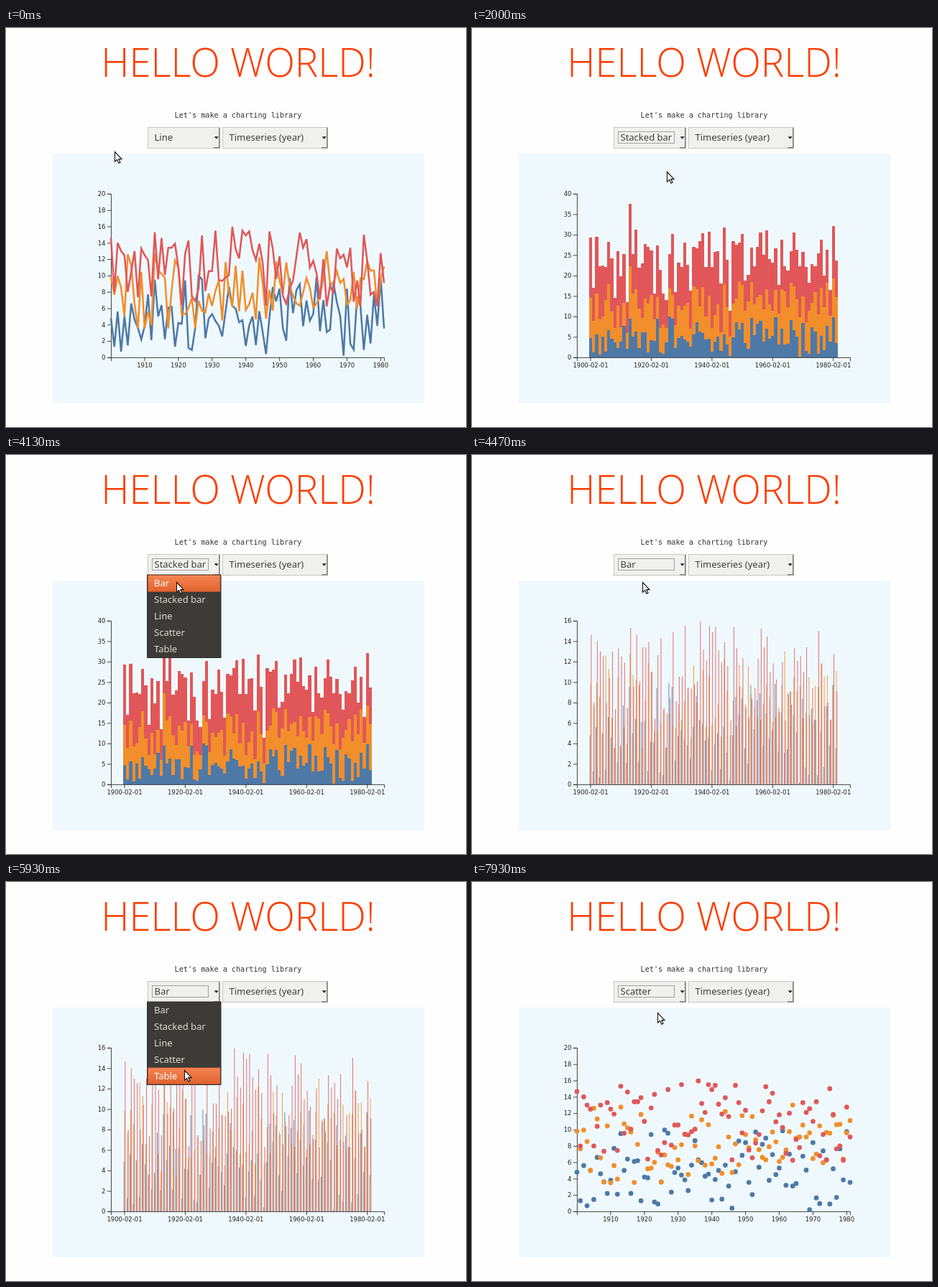
An HTML page that plays this animation: 640 px wide and 556 px high, repeating every 8 s.

```html
<!DOCTYPE html>
<html lang="en">
<head>
<meta charset="utf-8">
<title>Charting library</title>
<style>
  html, body { margin: 0; width: 100%; height: 100%; overflow: hidden; background: #fefefe; }
  svg { display: block; }
  text { white-space: pre; }
  .title { font: 300 54.5px "Open Sans", "Noto Sans", sans-serif; fill: #ff3d00; text-anchor: middle; }
  .sub { font: 10.13px "DejaVu Sans Mono", monospace; fill: #333; text-anchor: middle; }
  .ui { font: 13px "Noto Sans", "Open Sans", sans-serif; fill: #3c3c3c; }
  .menu text { fill: #dfdbd2; }
  .menu text.on { fill: #fff; }
  .axis { font: 10px "DejaVu Sans", sans-serif; }
  .axis path { fill: none; stroke: #222; }
  .axis text { fill: #222; }
  .line { fill: none; stroke-width: 3; }
</style>
</head>
<body>
<svg id="stage" width="640" height="556" viewBox="0 0 640 556">
  <defs>
    <linearGradient id="glow" x2="0" y2="1">
      <stop offset="0" stop-color="#f58553"/>
      <stop offset="1" stop-color="#e0622e"/>
    </linearGradient>
    <g id="box">
      <path d="M0 0h1v29h-1z" fill="#c4c4c0"/>
      <path d="M0 29.5V.5H100" fill="none" stroke="#c8c8c4"/>
    </g>
  </defs>
  <text class="title" x="323" y="68">HELLO WORLD!</text>
  <text class="sub" x="323" y="125">Let's make a charting library</text>
  <rect x="65" y="175" width="517" height="348" fill="#eff9fd"/>
  <g id="charts" transform="translate(146 231) scale(.8444)"></g>
  <g id="selects"></g>
  <text class="ui" id="value" x="206.5" y="157.3"></text>
  <text class="ui" x="310.5" y="157.3">Timeseries (year)</text>
  <rect id="focus" x="203.5" y="144.5" width="78" height="16" fill="none" stroke="#444" stroke-width=".9" stroke-dasharray="1 1"/>
  <g id="menu" class="menu">
    <rect x="196.5" y="167" width="102.5" height="115.5" fill="#3c3b37" stroke="#2f2e2a"/>
    <rect id="mark" x="197.5" width="100.5" height="22.8" fill="url(#glow)" stroke="#c9531f" stroke-width=".5"/>
  </g>
  <path id="cursor" d="M.5 .5V14.2L3.6 11.4 5.9 16.3 8 15.3 5.8 10.6H10z" fill="#fff" stroke="#111" stroke-width="1.1"/>
</svg>
<script>
const NS = "http://www.w3.org/2000/svg";
const $ = id => document.getElementById(id);
function add(parent, tag, attrs, text) {
  const el = document.createElementNS(NS, tag);
  for (const k in attrs) el.setAttribute(k, attrs[k]);
  if (text !== undefined) el.textContent = text;
  parent.appendChild(el);
  return el;
}

// yearly values, 1900 to 1981
const blue = [4.8, 1.3, 5.6, .7, 5, 1.45, 6.6, 4.6, 3.6, 2.2, 3.8, 7.7, 2.1, 9.5, 5, 6.4, 2.2, 6.1, 6.2, 1.3,
  4.2, 4.1, 9.4, 1.15, .9, 3.6, 9.95, 9.55, 2.35, 4.75, 5.3, 4.45, 3.85, 2.55, 5.65, 8.65, 6.3, 5.95, 4.3, 4.55,
  1.4, 3.9, 5, 1.5, 5.65, 3.1, .4, 4.85, 8.6, 6.85, 8.4, 3.55, 2.05, 9.7, 5.4, 8.2, 8.95, 3.8, 6.95, 4.5,
  5.3, 9.85, 3.2, 7, 3.1, 3.4, 9.1, 6.75, 5.05, .2, 8.4, 1.65, .95, 7.4, 6.3, .9, 5.2, 1.7, 7.65, 3.85, 9.75, 3.55];
const orange = [9.8, 7.65, 9.95, 8.55, 5, 12.6, 11.3, 6.55, 3.6, 10.45, 3.5, 5.6, 3.95, 12.75, 10.7, 10.2, 9.7, 3.55, 8.2, 11.85,
  11, 5.2, 5.3, 6, 7.25, 3.6, 6.9, 5.7, 5.5, 7.8, 6.3, 8.15, 9.4, 4.5, 11.65, 8, 6.2, 11.2, 5.65, 10.6,
  5.8, 6.5, 7.9, 4.65, 12.2, 9.1, 4.75, 8.25, 5.7, 11.7, 9.4, 7.8, 11.6, 8.75, 7.55, 6.6, 6.3, 7.9, 9.7, 8.5,
  6.1, 6.6, 7.5, 9.75, 13, 8.95, 9.1, 10.55, 9.1, 9.6, 6.45, 7, 10.45, 5.95, 9.65, 9.55, 11.75, 10.6, 10.65, 6.4, 9.6, 11.1];
const red = [14.65, 8, 14, 13, 12.5, 8, 10.4, 13, 7.35, 13.3, 12.5, 11.9, 7.45, 15.3, 9.55, 14.6, 10.05, 13.4, 13.4, 13.9,
  11, 6.4, 12.65, 14.3, 7.45, 6.9, 8.4, 14.9, 8.1, 10.55, 10.55, 15.5, 9.45, 9.35, 9.75, 10.05, 15.95, 13.2, 12.1, 15.5,
  14.9, 15.4, 13.1, 11.9, 13.9, 11.6, 6.3, 15.4, 13.3, 9.6, 12.35, 7.5, 6.55, 8.35, 9.4, 12.3, 15.25, 13.4, 14.45, 10.95,
  11.8, 10.25, 7.1, 12, 6.25, 8.8, 7.8, 13.3, 12.1, 12.55, 11, 13.4, 6.8, 9.4, 6.3, 15, 11.85, 7.65, 8, 6.25, 12.75, 9.1];
const series = [blue, orange, red];
const colors = ["#4e79a7", "#f28e2b", "#e15759"];
const W = 450, H = 270, STEP = 5, PAD = 20;
const yearX = i => i * W / 81;
const bandX = i => PAD + i * STEP;

function axes(g, max, gap, bands) {
  const a = add(g, "g", { class: "axis" });
  let d = `M-6 ${H + .5}H.5V.5H-6M.5 ${H + 6}V${H + .5}H${W + .5}V${H + 6}`;
  for (let v = 0; v <= max; v += gap) {
    const y = H - v / max * H + .5;
    d += `M0 ${y}H-6`;
    add(a, "text", { x: -9, y: y + 3.4, "text-anchor": "end" }, v);
  }
  for (let i = bands ? 0 : 10; i < 82; i += bands ? 20 : 10) {
    const x = bands ? bandX(i) + STEP / 2 : yearX(i - 1 / 12) + .5;
    d += `M${x} ${H}v6`;
    add(a, "text", { x, y: H + 16.1, "text-anchor": "middle" }, 1900 + i + (bands ? "-02-01" : ""));
  }
  add(a, "path", { d });
}

function chart(max, gap, bands, draw) {
  const g = add($("charts"), "g");
  const y = v => H - v / max * H;
  if (bands) draw(g, y);
  axes(g, max, gap, bands);
  if (!bands) draw(g, y);
  return g;
}

const bar = (x, top, bottom, w) => `M${x} ${bottom}V${top}h${w}V${bottom}z`;

const charts = {
  "Line": chart(20, 2, false, (g, y) => series.forEach((s, j) =>
    add(g, "path", { class: "line", stroke: colors[j], d: "M" + s.map((v, i) => yearX(i) + " " + y(v)).join("L") }))),
  "Stacked bar": chart(40, 5, true, (g, y) => {
    const base = blue.map(() => 0);
    series.forEach((s, j) => add(g, "path", {
      fill: colors[j], "shape-rendering": "crispEdges",
      d: s.map((v, i) => bar(bandX(i), y(base[i] + v), y(base[i]), STEP, base[i] += v)).join("")
    }));
  }),
  "Bar": chart(16, 2, true, (g, y) => series.forEach((s, j) =>
    add(g, "path", { fill: colors[j], d: s.map((v, i) => bar(bandX(i) + 1 + j, y(v), H, 1)).join("") }))),
  "Scatter": chart(20, 2, false, (g, y) => series.forEach((s, j) =>
    s.forEach((v, i) => add(g, "circle", { cx: yearX(i), cy: y(v), r: 4, fill: colors[j] }))))
};

function select(x, w) {
  const g = add($("selects"), "g", { transform: `translate(${x} 138)` });
  add(g, "rect", { x: .5, y: .5, width: w - 1, height: 29, fill: "#f0f0ee", stroke: "#c6c6c2" });
  add(g, "path", { d: `M${w - 9} 28.8H${w - 1.2}V1`, fill: "none", stroke: "#8b8b86", "stroke-width": 1.8 });
  add(g, "path", { d: `M${w - 8.3} 13.2h6l-3 3.6z`, fill: "#222" });
}
select(197, 101);
select(301, 147);

const ROW = 22.8, TOP = 167.7;
const items = ["Bar", "Stacked bar", "Line", "Scatter", "Table"];
const labels = items.map((s, i) => add($("menu"), "text", { class: "ui", x: 206, y: 183.3 + i * ROW }, s));

const STEPS = 120, LOOP = 8000;
const path = [
  [4, 151, 172], [8, 215, 215], [11, 304, 232], [13, 300, 190], [15, 285, 160],
  [22, 285, 160], [24, 280, 232], [26, 271, 200],
  [33, 271, 200], [36, 245, 165], [39, 205, 135], [42, 225, 121], [45, 254, 175],
  [49, 254, 175], [52, 234, 153],
  [58, 234, 153], [60, 238, 212], [62, 237, 177],
  [70, 237, 177], [72, 247, 160], [74, 258, 142],
  [81, 258, 142], [82, 254, 170], [86, 250, 215], [89, 248, 262], [91, 247, 258],
  [94, 247, 258], [99, 245, 242],
  [117, 245, 242], [119, 258, 182]
];
const picks = [[0, "Line"], [29, "Stacked bar"], [65, "Bar"], [101, "Scatter"]];
const opens = [[19, 29], [55, 65], [76, 101]];

function cursorAt(k) {
  const n = path.findIndex(p => p[0] >= k);
  if (n <= 0) return path[0].slice(1);
  const a = path[n - 1], b = path[n], u = (k - a[0]) / (b[0] - a[0]);
  return [a[1] + (b[1] - a[1]) * u, a[2] + (b[2] - a[2]) * u];
}
const picked = k => picks.filter(p => p[0] <= k).pop()[1];
const show = (el, on) => el.setAttribute("display", on ? "inline" : "none");

function render(k) {
  const [x, y] = cursorAt(k);
  const value = picked(k), drawn = picked(Math.max(0, k - 1));
  const open = opens.some(([a, b]) => k >= a && k < b);
  const row = y >= TOP ? Math.min(4, Math.floor((y - TOP) / ROW)) : items.indexOf(value);
  $("cursor").setAttribute("transform", `translate(${x} ${y})`);
  $("value").textContent = value;
  for (const name in charts) show(charts[name], name === drawn);
  show($("focus"), k >= opens[0][0]);
  show($("menu"), open);
  $("mark").setAttribute("y", TOP + row * ROW);
  labels.forEach((el, i) => el.classList.toggle("on", i === row));
}

let last = -1;
function tick() {
  const t = performance.now() % LOOP;
  const k = Math.min(STEPS - 1, Math.floor((t + 5) * STEPS / LOOP));
  if (k !== last) render(last = k);
  requestAnimationFrame(tick);
}
tick();
</script>
</body>
</html>
```
